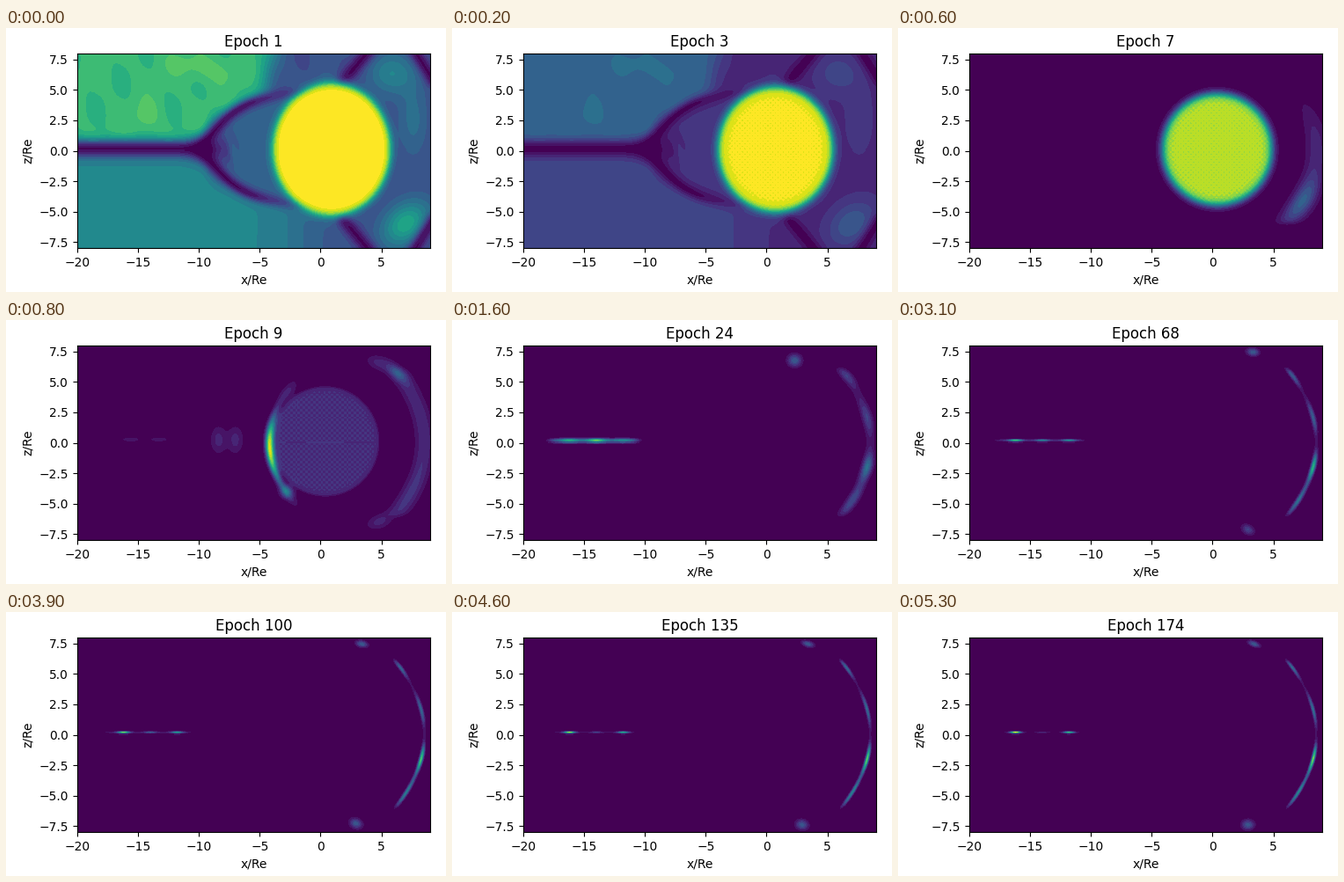
A matplotlib script that plays this animation: 500x300 px, repeating every 5.4 s.

```python
import numpy as np
import matplotlib.pyplot as plt
from matplotlib.animation import FuncAnimation

FRAMES, INTERVAL = 54, 100
W, H, DPI = 500, 300, 100
X0, X1, Z0, Z1 = -20, 9, -8, 8
SCALE = 13.824  # pixels per Earth radius
LEFT, BOTTOM = 80.92, 49.87
COLS, ROWS = 401, 221

x, z = np.meshgrid(
    X0 + (np.arange(COLS) + 0.5) * (X1 - X0) / COLS,
    Z0 + (np.arange(ROWS) + 0.5) * (Z1 - Z0) / ROWS,
)


def epoch(i):
    """The step between epochs grows by one every ten pictures."""
    d, r = divmod(i + 1, 10)
    return 5 * d * (d + 1) + r * (d + 1)


def ramp(i, start, end):
    return min(max((i - start) / (end - start), 0), 1)


def decay(i, start, tau):
    return np.exp(-max(i - start, 0) / tau)


def bell(t, mid, width):
    return np.exp(-((t - mid) / width) ** 2)


def step(t):
    return 1 / (1 + np.exp(-np.clip(t, -40, 40)))


def blob(cx, cz, sx, sz, tilt=0):
    return bell(x, cx, sx) * bell(z - tilt * (x - cx), cz, sz)


def streak(ax, az, bx, bz, width):
    """Soft line along the segment a-b."""
    ux, uz = bx - ax, bz - az
    t = np.clip(((x - ax) * ux + (z - az) * uz) / (ux**2 + uz**2), 0, 1)
    return np.exp(-((x - ax - t * ux) ** 2 + (z - az - t * uz) ** 2) / width**2)


def magnetosphere():
    """Lobes, plasma sheet and dark boundaries of the first picture."""
    run = 0.4 * np.logaddexp(0, (x + 9.6) / 0.4)
    h = 4.8 * (1 - np.exp(-run / 2.6))
    slope = 4.8 / 2.6 * np.exp(-run / 2.6) * step((x + 9.6) / 0.4)
    zs = z - 0.15
    dist = (np.abs(zs) - h) / np.sqrt(1 + slope**2)
    outside = step(dist / 0.15)

    upper = 0.26 + 0.40 * step((-4.3 - x + 0.2 * (z - 6)) / 0.5)
    upper += 0.03 * np.sin(1.5 * x + 1) * np.cos(0.9 * z + 0.5 * x)
    upper += 0.07 * blob(-9.5, 6.7, 3, 1.1, -0.15) + 0.07 * blob(-14.3, 2.8, 1.1, 1.3)
    lower = 0.27 + 0.19 * step((-1.8 - x) / 1.2) + 0.03 * blob(-13, -6, 4, 1.5)
    inner = 0.32 - 0.1 * blob(-8, 0, 0.7, 1.5)
    inner += 0.03 * np.sin(5 * x + 2 * z) * blob(-7.3, 0, 0.8, 1.5)
    v = outside * np.where(zs > 0, upper, lower) + (1 - outside) * inner

    sheet = step((-8.5 - x) / 0.5)
    depth = 0.9 - 0.5 * step((x + 4.6) / 0.7)
    v *= 1 - depth * np.exp(-(dist / (0.5 + 0.22 * sheet)) ** 2)
    v *= 1 - 0.95 * blob(-9.4, 0.1, 1.2, 0.9)

    day = step((x - 3.2) / 0.5)
    dayside = 0.25 + 0.2 * blob(5.8, 6.3, 2, 1.8) + 0.12 * blob(7.6, 2.5, 1.2, 3)
    dayside += 0.34 * blob(7, -6, 2, 1.8, 0.3)
    v = v * (1 - day) + dayside * day
    for s in (1, -1):
        v *= 1 - 0.85 * streak(1.9, 5.7 * s, 4, 8.2 * s, 0.6)
        v *= 1 - 0.85 * streak(7.7, 8.2 * s, 9.2, 5.8 * s, 0.55)
    return v


def wreckage():
    """Faint leftovers scattered around the fading disc."""
    v = 0.25 * blob(-2.8, -4, 0.5, 0.5) + 0.2 * blob(6.3, 5.7, 0.8, 0.6, -0.6)
    for cx in (-15.6, -13.3):
        v += 0.09 * blob(cx, 0.2, 0.8, 0.2)
    for cx in (-8.4, -7):
        v += 0.12 * blob(cx, 0.2, 0.65, 1.1)
    for s in (1, -1):
        v += 0.1 * blob(-2.7, 4.1 * s, 0.8, 0.7, 0.7 * s)
        v += 0.12 * blob(4.8, 6.5 * s, 1, 0.6, -0.2 * s)
    return v


SCENE = magnetosphere()
DEBRIS = wreckage()
CRESCENT = bell(x, -4.2 + 0.08 * z**2, 0.33) * bell(z, -0.5, 2.5)
GRAIN = np.sin(15 * x) * np.sin(15 * z)


def disc(i):
    shrink, dim = ramp(i, 0, 6), ramp(i, 6, 8)
    rx = 4.85 - 0.35 * shrink - 0.1 * dim
    rz = 5.45 - 0.9 * shrink - 0.1 * dim
    rho = np.hypot((x - 0.9 + 0.52 * shrink) / rx, (z - 0.08) / rz)
    mask = step((1 - rho) * (rx + rz) / 2 / (0.2 - 0.12 * dim))
    glow = (1 - 0.13 * shrink - 0.72 * dim) * (1 - ramp(i, 8, 12))
    grain = GRAIN * 0.028 * shrink * (1 - 0.8 * dim)
    return mask, glow + grain * (i < 12)


def arc(i):
    """Dayside boundary: wide and faint at first, then thin and bright."""
    grow = 1 - decay(i, 8, 18)
    faint = 0.13 * ramp(i, 6, 8) * decay(i, 8, 12)
    first = bell(i, 6, 1.4) * (0.28 * bell(z, -4.3, 2) + 0.13 * bell(z, 0, 3.8))
    south = 0.85 * bell(z, -2, 1.1) + 0.5 * bell(z, -4.7, 1.3)
    north = 0.4 * (bell(z, 5.5, 0.9) + bell(z, 2, 1.3))
    amp = (faint + first + grow * (south + north)) * step((6 - np.abs(z)) / 0.15)
    width = 0.13 + 0.75 * decay(i, 6, 10)
    d = (x - 8.52 + 0.066 * z**2) / np.sqrt(1 + (0.132 * z) ** 2)
    return amp * bell(d, 0, width)


def tail(i):
    """Thin current sheet that breaks up into three knots."""
    u, rise = ramp(i, 8, 53), ramp(i, 8, 14)
    row = 0.3 * decay(i, 16, 18) * step((x + 17.8) / 0.2) * step((-10.6 - x) / 0.2)
    amps = (0.2 + 0.75 * u, 0.5 * np.exp(-1.6 * u**2), 0.1 + 0.55 * u)
    for k, amp in enumerate(amps):
        row = row + amp * bell(x, -16.2 + 2.2 * k, 0.4 + 0.4 * decay(i, 16, 15))
    return rise * row * bell(z, 0.13, 0.08 + 0.08 * decay(i, 16, 10))


def cusps(i):
    shrink = decay(i, 16, 15)
    u = ramp(i, 8, 53)
    north = 0.3 * ramp(i, 9, 16) * blob(
        3.4 - 1.1 * decay(i, 16, 6), 7.4 - 0.7 * decay(i, 16, 3),
        0.45 + 0.1 * shrink, 0.2 + 0.3 * shrink, -0.3 * u**2)
    south = 0.28 * ramp(i, 19, 35) * blob(
        2.9, -7 - 0.4 * ramp(i, 23, 45), 0.5, 0.4, -0.5 * (1 - u))
    return north + south


def field(i):
    mask, glow = disc(i)
    v = SCENE * (1 - ramp(i, 0, 4)) * (1 - mask) + glow * mask
    v = v + 0.92 * CRESCENT * ramp(i, 6, 8) * (1 - ramp(i, 8, 13))
    v = v + DEBRIS * ramp(i, 6, 8) * (1 - ramp(i, 8, 12))
    return np.clip(v + arc(i) + tail(i) + cusps(i), 0, 1)


fig = plt.figure(figsize=(W / DPI, H / DPI), dpi=DPI)
ax = fig.add_axes([LEFT / W, BOTTOM / H,
                   SCALE * (X1 - X0) / W, SCALE * (Z1 - Z0) / H])
image = ax.imshow(field(0), origin="lower", extent=(X0, X1, Z0, Z1), aspect="auto",
                  cmap=plt.get_cmap("viridis", 20), vmin=0, vmax=1,
                  interpolation="nearest")
ax.set_xticks(range(-20, 6, 5))
ax.set_yticks(np.arange(-7.5, 8, 2.5))
ax.set_xlabel("x/Re")
ax.set_ylabel("z/Re")
title = ax.set_title("Epoch 1")


def update(i):
    image.set_data(field(i))
    title.set_text(f"Epoch {epoch(i)}")
    return image, title


anim = FuncAnimation(fig, update, frames=FRAMES, interval=INTERVAL,
                     repeat=True, repeat_delay=0, blit=False)
plt.show()
```
